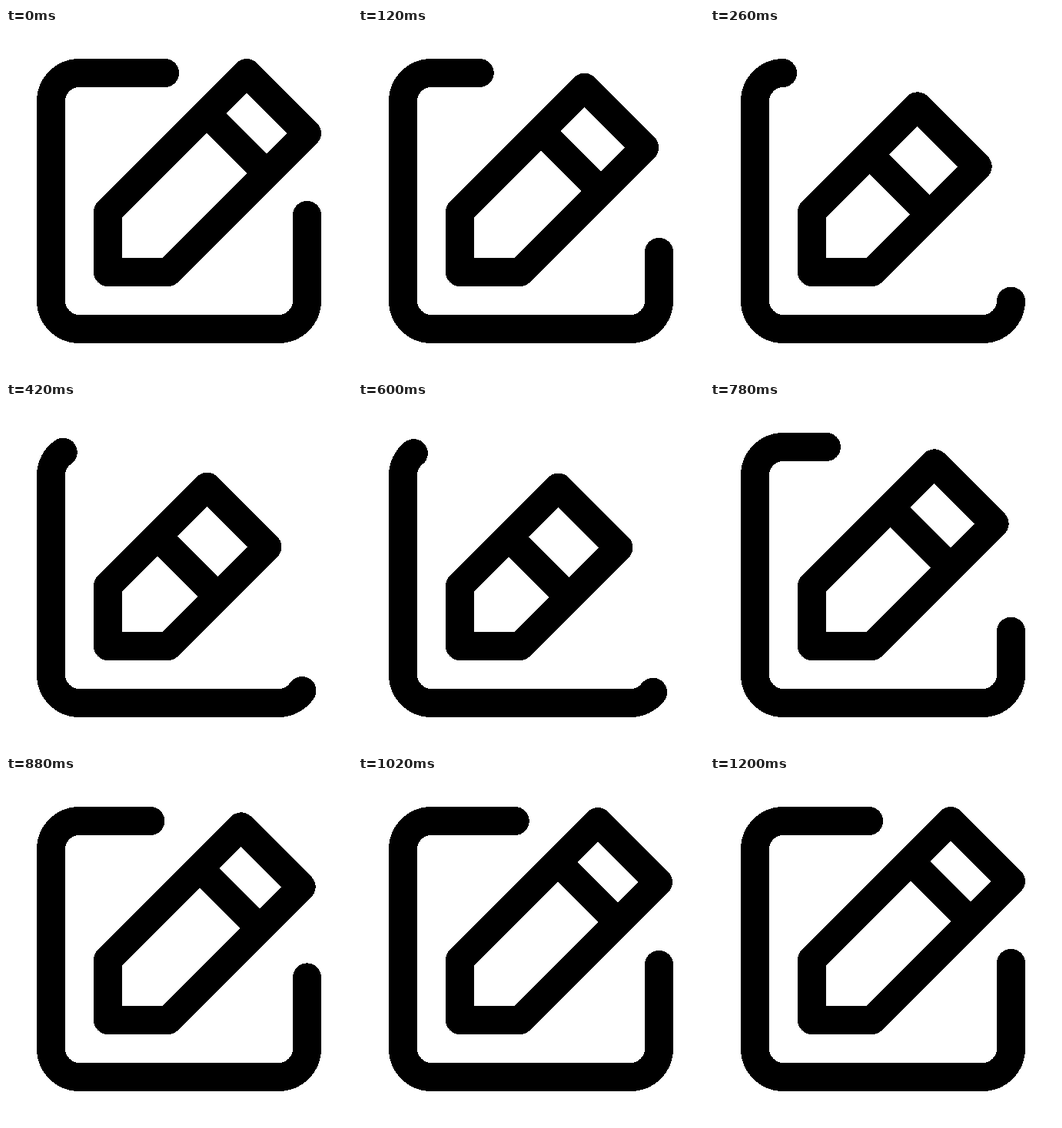
Animation of 450 by 450 pixels, one loop 3.02 s. Source, as an HTML page:

```html
<!DOCTYPE html>
<html lang="en">
<head>
<meta charset="utf-8">
<title>Edit icon</title>
<style>
  html, body { margin: 0; height: 100%; overflow: hidden; background: #fff; }
  svg { display: block; width: 100%; height: 100%; }
  path {
    fill: none; stroke: #000; stroke-width: 37;
    stroke-linecap: round; stroke-linejoin: round;
    shape-rendering: crispEdges;
  }
  #band { stroke-width: 36.4; }
</style>
</head>
<body>
<svg viewBox="0 0 450 450">
  <path id="sheet" d="M206.6 58.5H95.5A37 37 0 0 0 58.5 95.5V354.5A37 37 0 0 0 95.5 391.5H354.5A37 37 0 0 0 391.5 354.5V243.4"/>
  <path id="pencil"/>
  <path id="band"/>
</svg>
<script>
  const LOOP = 3020, HALF = 600, STEP = 20;
  const [sheet, pencil, band] = ['sheet', 'pencil', 'band'].map(id => document.getElementById(id));
  const length = sheet.getTotalLength();

  // Quick start with a long, soft landing
  const ease = x => 1 - Math.exp(-7.7 * x ** 1.78);

  // 0 = full icon, 1 = fully retracted
  function retraction(t) {
    if (t >= 2 * HALF) return 0;
    return t < HALF ? ease(t / HALF) : 1 - ease(t / HALF - 1);
  }

  function draw(t) {
    const p = retraction(t);
    const trim = 136 * p, tip = 52.4 * p, slide = 64.8 * p;
    sheet.setAttribute('stroke-dasharray', `${length - 2 * trim} ${length}`);
    sheet.setAttribute('stroke-dashoffset', -trim);
    pencil.setAttribute('d',
      `M132.5 317.5V239.25L${313.1 - tip} ${58.6 + tip}L${391.4 - tip} ${136.9 + tip}L210.75 317.5Z`);
    band.setAttribute('d',
      `M${261.2 - slide} ${111.2 + slide}L${338.8 - slide} ${188.8 + slide}`);
  }

  const start = performance.now();
  function frame() {
    const t = (performance.now() - start) % LOOP;
    draw(Math.floor(t / STEP) * STEP);
    requestAnimationFrame(frame);
  }
  frame();
</script>
</body>
</html>
```
